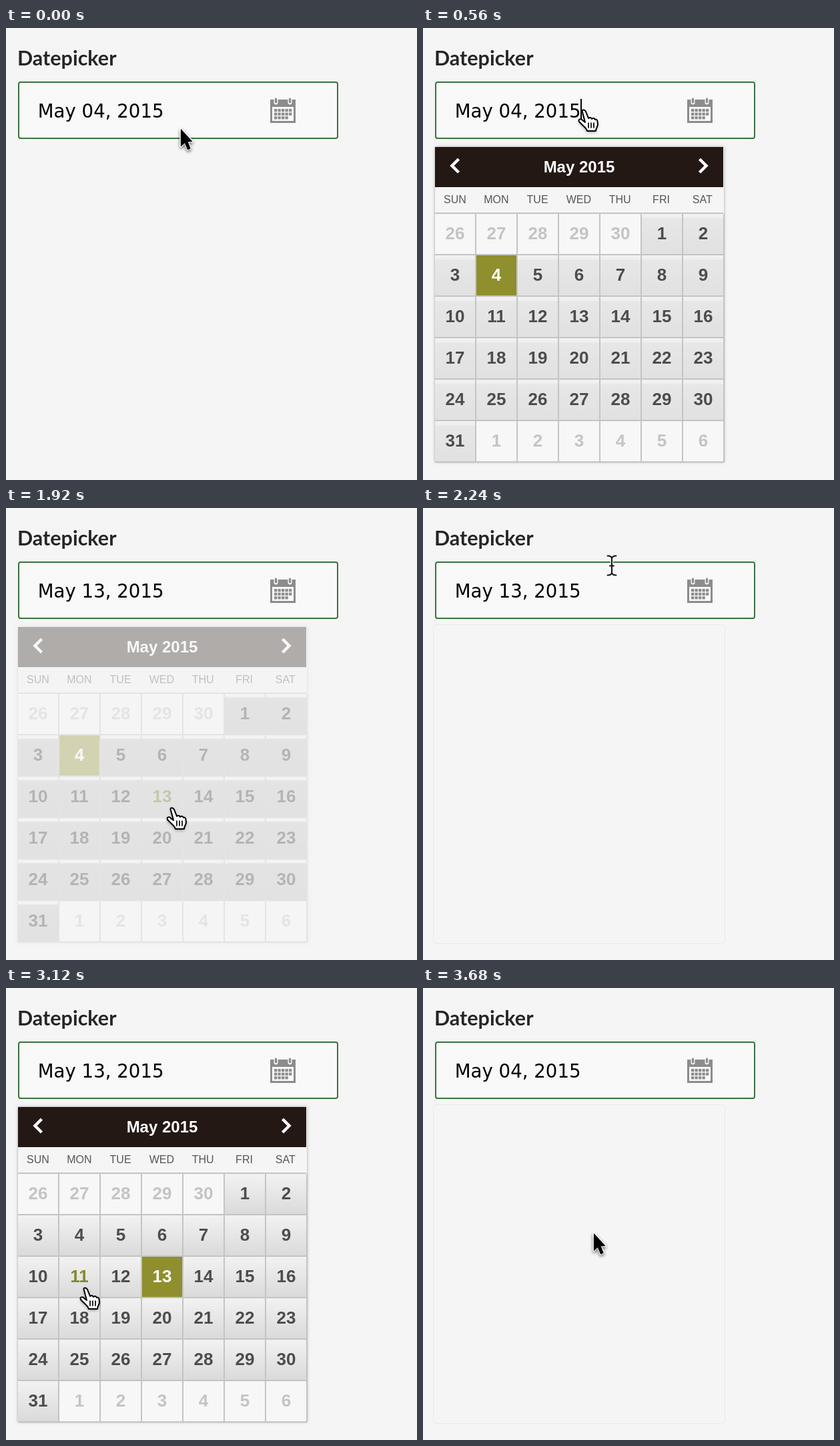
An HTML page with a canvas for the animation above (4180 ms loop, 616 px wide and 676 px high).

```html
<!DOCTYPE html>
<html lang="en">
<head>
<meta charset="utf-8">
<title>Datepicker</title>
<style>
html, body { margin: 0; width: 100%; height: 100%; overflow: hidden; background: #f5f5f5; }
canvas { display: block; width: 616px; height: 676px; }
</style>
</head>
<body>
<canvas id="stage" width="616" height="676"></canvas>
<script>
const ctx = document.getElementById('stage').getContext('2d');
const LOOP = 4180, STEP = 80, LAST = 3680;
const PAGE = '#f5f5f5', LINE = '#c4c4c4', OLIVE = '#8f8f2d';
const ARIAL = '"Liberation Sans", Arial, sans-serif';
const DAYS = ['SUN', 'MON', 'TUE', 'WED', 'THU', 'FRI', 'SAT'];

// [time, opacity] of the calendar
const fadeKeys = [[0, 0], [320, 0], [400, .33], [560, 1], [1760, 1], [1840, .66], [1920, .33], [2000, 0],
  [2560, 0], [2640, .1], [2720, .33], [2880, 1], [3520, 1], [3600, .5], [3680, 0]];

// [time, x, y, pointer kind]
const pointerKeys = [
  [0, 261, 150, 'arrow'], [80, 254, 122, 'beam'], [160, 240, 120, 'beam'], [240, 232, 122, 'hand'],
  [880, 232, 122, 'hand'], [1040, 229, 215, 'hand'], [1200, 231, 364, 'hand'], [1280, 236, 397, 'hand'],
  [1440, 239, 439, 'hand'], [1600, 240, 448, 'hand'], [2000, 240, 448, 'hand'],
  [2080, 252, 400, 'arrow'], [2160, 262, 240, 'arrow'], [2240, 275, 70, 'beam'], [2320, 265, 100, 'beam'],
  [2800, 265, 100, 'beam'], [2880, 232, 190, 'hand'], [2960, 217, 300, 'hand'], [3040, 150, 415, 'hand'],
  [3120, 110, 448, 'hand'], [3200, 88, 445, 'hand'], [3280, 76, 420, 'hand'], [3440, 98, 373, 'hand'],
  [3600, 98, 373, 'hand'], [3680, 255, 366, 'arrow']];

const caretSpans = [[480, 800], [1120, 1440], [1760, 1840], [2720, 3040], [3360, 3520]];

function sample(keys, t) {
  let i = 0;
  while (i < keys.length - 1 && keys[i + 1][0] <= t) i++;
  const a = keys[i], b = keys[i + 1] || a;
  const k = b === a ? 0 : (t - a[0]) / (b[0] - a[0]);
  return a.map((v, n) => typeof v === 'number' ? v + (b[n] - v) * k : v);
}

function rect(x, y, w, h, color) {
  ctx.fillStyle = color;
  ctx.fillRect(x, y, w, h);
}

function text(s, x, y, font, color, align = 'left') {
  ctx.font = font;
  ctx.fillStyle = color;
  ctx.textAlign = align;
  ctx.fillText(s, x, y);
}

function polyline(points, color, width) {
  ctx.beginPath();
  points.forEach(p => ctx.lineTo(...p));
  ctx.strokeStyle = color;
  ctx.lineWidth = width;
  ctx.stroke();
}

function drawIcon() {
  const gray = '#8c8c8c';
  rect(396, 107, 38, 35, gray);
  rect(399, 118, 32, 21, '#f9f9f9');
  for (let i = 0; i < 14; i++) rect(402 + i % 5 * 5.5, 121 + Math.floor(i / 5) * 5.6, 4.3, 4.2, gray);
  for (const x of [404.5, 425.5]) {
    ctx.beginPath();
    ctx.roundRect(x - 3, 103.5, 6, 11, 3);
    ctx.fillStyle = '#f9f9f9';
    ctx.fill();
    ctx.beginPath();
    ctx.roundRect(x - 1.6, 104.5, 3.2, 8, 1.6);
    ctx.fillStyle = gray;
    ctx.fill();
  }
}

function drawField(value, caret) {
  text('Datepicker', 17, 56, 'bold 30.5px Lato, sans-serif', '#262626');
  ctx.beginPath();
  ctx.roundRect(19, 81, 478, 84, 3);
  ctx.fillStyle = '#f9f9f9';
  ctx.fill();
  ctx.strokeStyle = '#39743f';
  ctx.lineWidth = 2;
  ctx.stroke();
  text(value, 47.8, 134, '27.6px "DejaVu Sans", sans-serif', '#000');
  if (caret) rect(236, 106, 2, 34, '#000');
  drawIcon();
}

const inMonth = i => i > 4 && i < 36;
const dayNumber = i => i < 5 ? 26 + i : i < 36 ? i - 4 : i - 35;
const cellX = i => 18 + i % 7 * 62;
const cellY = i => 278 + Math.floor(i / 7) * 62;

function cellFill(y, mode) {
  const g = ctx.createLinearGradient(0, y, 0, y + 60);
  if (mode === 'first') {
    g.addColorStop(0, '#f2f2f2');
    g.addColorStop(.09, '#efefef');
    g.addColorStop(.12, '#e7e7e7');
    g.addColorStop(1, '#e1e1e1');
  } else {
    g.addColorStop(0, '#f2f2f2');
    g.addColorStop(1, '#dadada');
  }
  return g;
}

function drawCalendar(opacity, selected, hover, mode, closing) {
  ctx.save();
  ctx.shadowColor = 'rgba(0,0,0,.35)';
  ctx.shadowBlur = 4;
  rect(18, 178, 433, 471, PAGE);
  ctx.restore();

  rect(18, 178, 432, 60, '#231813');
  text('May 2015', 234, 216, 'bold 24px ' + ARIAL, '#fff', 'center');
  polyline([[53.5, 196], [43.5, 206], [53.5, 216]], '#fff', 4.5);
  polyline([[414.5, 196], [424.5, 206], [414.5, 216]], '#fff', 4.5);
  DAYS.forEach((d, i) => text(d, 48 + i * 61.8, 262, '16px ' + ARIAL, '#555', 'center'));
  rect(18, 276, 432, 2, LINE);

  for (let i = 0; i < 42; i++) {
    const x = cellX(i), y = cellY(i), n = dayNumber(i), live = inMonth(i);
    rect(x, y, 62, 62, LINE);
    rect(x, y, 60, 60, '#f7f7f7');
    let ink = live ? '#4d4d4d' : LINE;
    if (live && n === selected) {
      rect(x, y, 60, 60, OLIVE);
      ink = '#fff';
    } else if (live) {
      if (mode !== 'flat') rect(x, y, 60, 60, cellFill(y, mode));
      if (n === hover) ink = '#85872d';
    }
    text(n, x + 30, y + 38, 'bold 26px ' + ARIAL, ink, 'center');
  }

  if (opacity < 1) {
    ctx.globalAlpha = 1 - opacity;
    rect(12, 172, 446, 484, PAGE);
    ctx.globalAlpha = 1;
    if (closing) {
      ctx.globalCompositeOperation = 'multiply';
      for (let i = 5; i < 36; i++)
        if (dayNumber(i) !== selected) rect(cellX(i), cellY(i) + 5, 60, 55, '#f3f3f3');
      ctx.globalCompositeOperation = 'source-over';
    }
  }
}

const arrowPath = new Path2D('M1 1V27L7 21.5L11.3 32L15.5 30.2L11.2 20H18.5Z');
const handPath = new Path2D('M7 4C5 0 10 -1 12 3L16 13C18 11 20 12 21 14C23 12 25 13 26 15' +
  'C28 14 29.5 16 29.5 18L30 22C30 26 27 27 27 32H14C13 27 7 24 2 18C0 14 5 13 7 16L11 19Z');
const beamPath = new Path2D('M1.5 1.5C5 1.5 8 3 8 6V26C8 29 5 30.5 1.5 30.5' +
  'M14.5 1.5C11 1.5 8 3 8 6M8 26C8 29 11 30.5 14.5 30.5M5 16.5H11');

function outline(path, color, width) {
  ctx.strokeStyle = color;
  ctx.lineWidth = width;
  ctx.stroke(path);
}

function drawPointer(x, y, kind) {
  ctx.save();
  ctx.translate(x, y);
  ctx.lineJoin = ctx.lineCap = 'round';
  if (kind === 'beam') {
    outline(beamPath, '#fff', 4);
    outline(beamPath, '#111', 2);
  } else {
    ctx.shadowColor = 'rgba(0,0,0,.4)';
    ctx.shadowBlur = 4;
    ctx.shadowOffsetY = 2;
    if (kind === 'arrow') outline(arrowPath, '#fff', 3.5);
    ctx.fillStyle = kind === 'arrow' ? '#000' : '#fff';
    const path = kind === 'arrow' ? arrowPath : handPath;
    ctx.fill(path);
    ctx.shadowColor = 'transparent';
    ctx.fill(path);
    if (kind === 'hand') {
      outline(handPath, '#000', 2);
      for (const px of [16, 20, 24]) polyline([[px, 20], [px, 27]], '#000', 1.7);
    }
  }
  ctx.restore();
}

function hoveredDay(x, y, kind) {
  if (kind !== 'hand' || y < 278) return 0;
  const i = Math.floor((y - 278) / 62) * 7 + Math.floor((x + 9 - 18) / 62);
  return inMonth(i) ? dayNumber(i) : 0;
}

function draw(now) {
  const t = Math.min(Math.floor(now % LOOP / STEP) * STEP, LAST);
  const opacity = sample(fadeKeys, t)[1];
  const [, x, y, kind] = sample(pointerKeys, t);
  const later = t >= 1840 && t < 3600;
  const closing = (t >= 1840 && t < 2000) || t === 3600;
  const mode = t < 2080 ? 'first' : t < 2880 ? 'flat' : 'second';

  rect(0, 0, 616, 676, PAGE);
  drawField(later ? 'May 13, 2015' : 'May 04, 2015', caretSpans.some(([a, b]) => t >= a && t < b));
  if (opacity > 0) {
    drawCalendar(opacity, t > 2000 ? 13 : 4, hoveredDay(x, y, kind), mode, closing);
  } else if (t >= 2000) {
    ctx.beginPath();
    ctx.roundRect(15.5, 174.5, 437, 477, 5);
    ctx.strokeStyle = '#e9e9e9';
    ctx.lineWidth = 1;
    ctx.stroke();
  }
  drawPointer(x, y, kind);
}

const start = performance.now();
function tick() {
  draw(performance.now() - start);
  requestAnimationFrame(tick);
}
tick();
</script>
</body>
</html>
```
